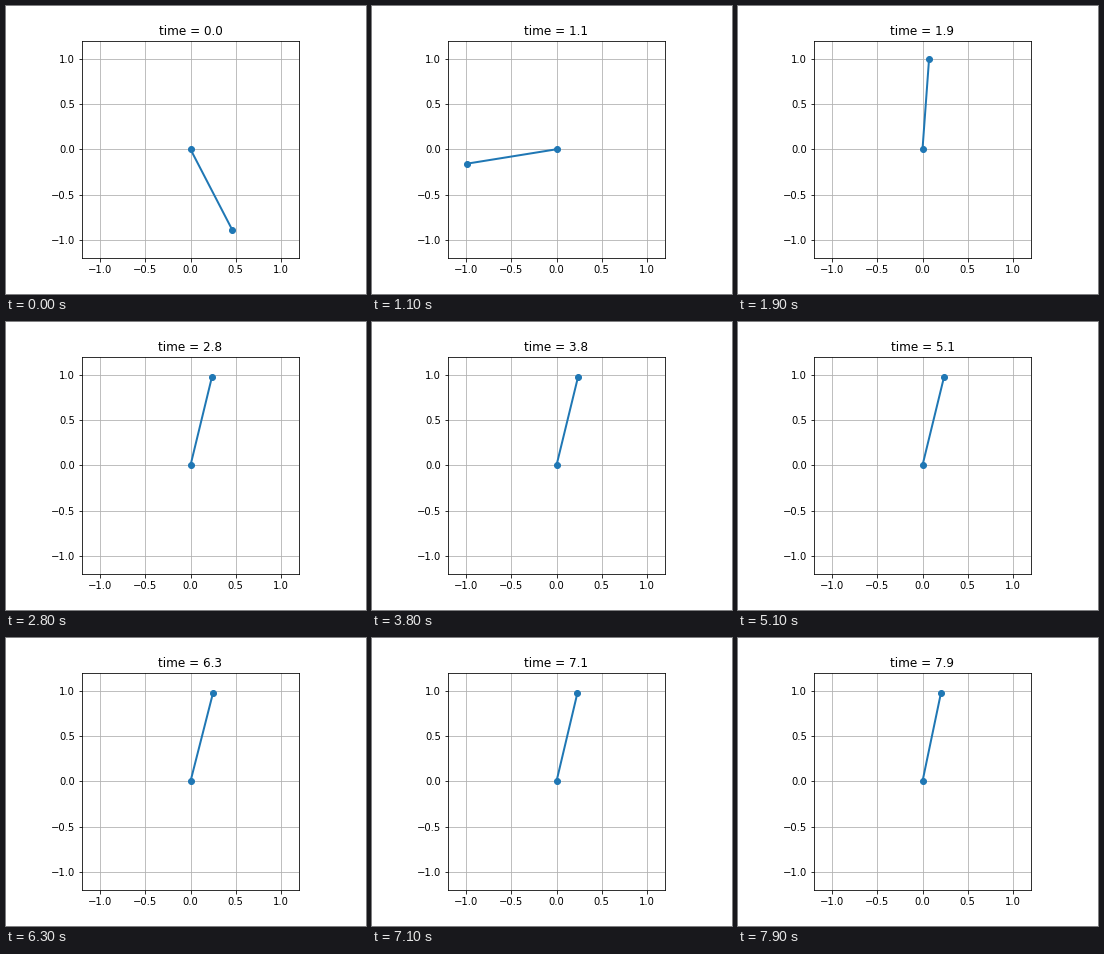
These frames come from a looping animation (360x288 px, 8 s). A matplotlib script:

```python
import matplotlib.pyplot as plt
import numpy as np
from matplotlib.animation import FuncAnimation

FRAMES, STEP = 80, 0.1
SUB = 100  # integration steps per frame
G = 9.8
SWITCH, CATCH = 4, 12  # frames where the torque changes, then balancing begins


def swing_up():
    """Angles from straight down, driven by a two-stage torque."""
    h = STEP / SUB
    phi, omega = 0.478, 3.22
    path = []
    for n in range(CATCH + 1):
        path.append(phi)
        torque = -1.7 if n < SWITCH else -4.5
        for _ in range(SUB):
            mid = phi + omega * h / 2
            omega += (torque - G * np.sin(mid)) * h
            phi = mid + omega * h / 2
    return path


def lean(t):
    """Slowly wandering rest angle past the top, in degrees."""
    return np.interp(t, [5.1, 6.3, 6.8, 7.9], [13.7, 14.3, 13.9, 11.8])


SWING = swing_up()


def angle(n):
    if n <= CATCH:
        return SWING[n]
    t = n * STEP
    s = t - CATCH * STEP
    rest = -np.pi - np.radians(lean(t))
    gap = SWING[-1] + np.pi + np.radians(lean(0))
    return rest + gap * np.exp(-2.18 * s - 1.49 * s * s)


fig = plt.figure(figsize=(5, 4), dpi=72, facecolor="white")
fig.subplots_adjust(left=0.125, right=0.9, bottom=0.125, top=0.88)
ax = fig.add_subplot(aspect="equal", xlim=(-1.2, 1.2), ylim=(-1.2, 1.2))
ticks = np.arange(-1, 1.1, 0.5)
ax.set_xticks(ticks)
ax.set_yticks(ticks)
ax.grid()
rod, = ax.plot([], [], "o-", lw=2)
title = ax.set_title("")


def update(n):
    phi = angle(n)
    rod.set_data([0, np.sin(phi)], [0, -np.cos(phi)])
    title.set_text(f"time = {n * STEP:.1f}")
    return rod, title


anim = FuncAnimation(fig, update, frames=FRAMES, interval=100,
                     repeat=True, repeat_delay=0)
plt.show()
```
